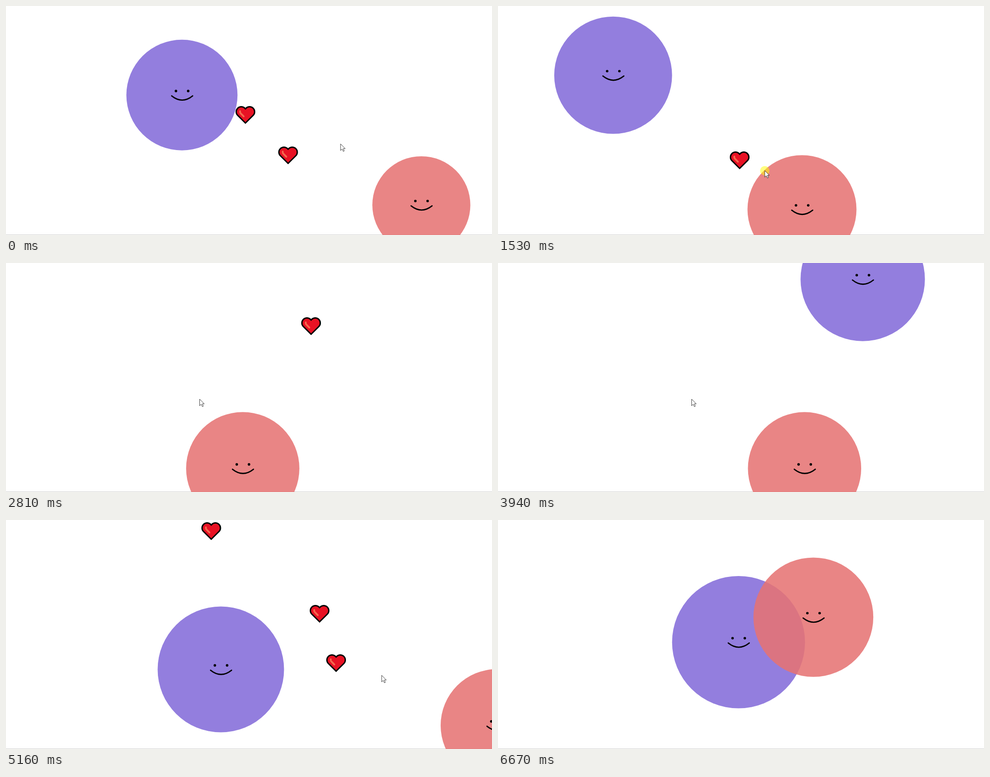
An HTML page with a canvas that plays this animation: 1088 px wide and 515 px high, repeating every 6.74 s.

```html
<!DOCTYPE html>
<html lang="en">
<head>
<meta charset="utf-8">
<title>Two friends and hearts</title>
<style>
  html, body { margin: 0; width: 100%; height: 100%; overflow: hidden; background: #fff; }
  canvas { display: block; }
</style>
</head>
<body>
<canvas id="stage" width="1088" height="515"></canvas>
<script>
const LOOP = 6740;
const HEART_LIFE = 700;
const HEART_DELAY = 50;
const CLICK_GLOW = 60;
const REACH = 5;
const ctx = document.getElementById('stage').getContext('2d');

// Key poses: time, x, y, radius
const purple = [
  [0, 394, 200, 124.4], [720, 293, 395, 128], [1120, 88, 372, 129], [1530, 257.3, 156.1, 131.9],
  [2100, 560, -60, 134], [2700, 690, -150, 136], [3300, 728, -140, 139], [3940, 816.5, 36.2, 139.2],
  [4660, 574, 240, 141], [5160, 481.2, 336, 141.5], [5650, 299, 294, 145],
  [6020, 391, 203, 146.4], [6670, 538.5, 274.8, 148.8]
];
const red = [
  [0, 930, 447.6, 109.7], [1530, 680.6, 457.4, 122], [2100, 650.5, 462, 126.8],
  [2810, 530, 462, 126.8], [3300, 530, 462, 126.8], [3940, 686, 462, 126.8],
  [5160, 1099.8, 462, 126.8], [6020, 735.5, 455, 134], [6670, 706, 218.6, 134.2]
];
// Pointer stops: time, x, y, clicked
const pointer = [
  [-200, 536, 245, 1], [-100, 631.5, 335.8, 1], [0, 749, 310.5, 0], [400, 190, 340, 1],
  [700, 45, 70, 1], [800, 92, 92, 1], [1400, 541, 347, 1], [1525, 596, 370.5, 1],
  [2200, 683, 142, 1], [2600, 433.5, 306.5, 0], [3990, 433.5, 306.5, 0], [4500, 459.5, 25, 1],
  [4900, 702, 210.8, 1], [5020, 739, 321.8, 1], [5160, 841, 349.5, 0], [5600, 604.8, 388, 1],
  [6020, 975.5, 462.5, 0], [6250, 1035, 540, 0]
];

const heartShape = new Path2D(
  'M0 18.2L-17.3.9A11.3 11.3 0 0 1-1.3-15.1L0-13.7L1.3-15.1A11.3 11.3 0 0 1 17.3.9Z');
const heartShine = new Path2D('M-12-8.5Q-12.5-5-10-3L-4 3.2');
const arrowShape = new Path2D('M0 0V14.5L3.5 11.2L6 16.5L8.3 15.5L6 10.3H10Z');
const smile = new Path2D('M-23 1.8Q.5 20.8 24 1.8');

// Smooth interpolation without overshoot
function sample(rows, time) {
  const last = rows.length - 1;
  const t = Math.max(time, rows[0][0]);
  if (t >= rows[last][0]) return rows[last].slice(1);
  let i = 0;
  while (rows[i + 1][0] <= t) i++;
  const slope = (k, c) => (rows[k + 1][c] - rows[k][c]) / (rows[k + 1][0] - rows[k][0]);
  const tangent = (k, c) => {
    if (k === 0) return slope(0, c);
    if (k === last) return slope(last - 1, c);
    const a = slope(k - 1, c), b = slope(k, c);
    return a * b > 0 ? 2 * a * b / (a + b) : 0;
  };
  const a = rows[i], b = rows[i + 1];
  const span = b[0] - a[0], u = (t - a[0]) / span, v = 1 - u;
  return a.slice(1).map((p, n) => {
    const c = n + 1;
    return v * v * (1 + 2 * u) * p + u * u * (1 + 2 * v) * b[c] +
      span * u * v * (v * tangent(i, c) - u * tangent(i + 1, c));
  });
}

// A click drops a heart that lasts until a friend touches it or it expires
function dropHeart([click, x, y]) {
  const from = click + HEART_DELAY;
  const touched = t => [purple, red].some(rows => {
    const [fx, fy, r] = sample(rows, t);
    return Math.hypot(x - fx, y - fy) < r + REACH;
  });
  let to = from;
  while (to < click + HEART_LIFE && !touched(to)) to += 10;
  return { x, y, click, from, to };
}
const hearts = pointer.filter(stop => stop[3]).map(dropHeart);

function at(x, y, draw) {
  ctx.save();
  ctx.translate(x, y);
  draw();
  ctx.restore();
}

function disc(x, y, r, color) {
  ctx.fillStyle = color;
  ctx.beginPath();
  ctx.arc(x, y, r, 0, Math.PI * 2);
  ctx.fill();
}

function outline(path, color, width) {
  ctx.strokeStyle = color;
  ctx.lineWidth = width;
  ctx.stroke(path);
}

function friend([x, y, r], color) {
  at(x, y, () => {
    disc(0, 0, r, color);
    for (const side of [-1, 1]) disc(.3 + side * 13.7, -9.1, 2.8, '#000');
    outline(smile, '#000', 2.8);
  });
}

function heart({ x, y }) {
  at(x, y, () => {
    ctx.fillStyle = '#e81224';
    ctx.fill(heartShape);
    outline(heartShine, '#f4694f', 4);
    outline(heartShape, '#000', 3);
  });
}

function arrow(x, y) {
  at(x, y, () => {
    ctx.fillStyle = '#fff';
    ctx.fill(arrowShape);
    outline(arrowShape, '#222', .9);
  });
}

function render(t) {
  ctx.fillStyle = '#fff';
  ctx.fillRect(0, 0, 1088, 515);
  ctx.fillStyle = '#cfcfcf';
  ctx.fillRect(0, 514, 1088, 1);
  ctx.lineCap = 'round';

  friend(sample(purple, t), '#937ede');
  friend(sample(red, t), 'rgba(230,115,115,.87)');
  hearts.filter(h => t >= h.from && t < h.to).forEach(heart);

  const [x, y] = sample(pointer, t);
  if (hearts.some(h => t >= h.click && t < h.click + CLICK_GLOW)) {
    disc(x, y, 10.5, 'rgba(255,255,0,.5)');
  }
  arrow(x, y);
}

const start = performance.now();
function tick() {
  render((performance.now() - start) % LOOP);
  requestAnimationFrame(tick);
}
tick();
</script>
</body>
</html>
```
